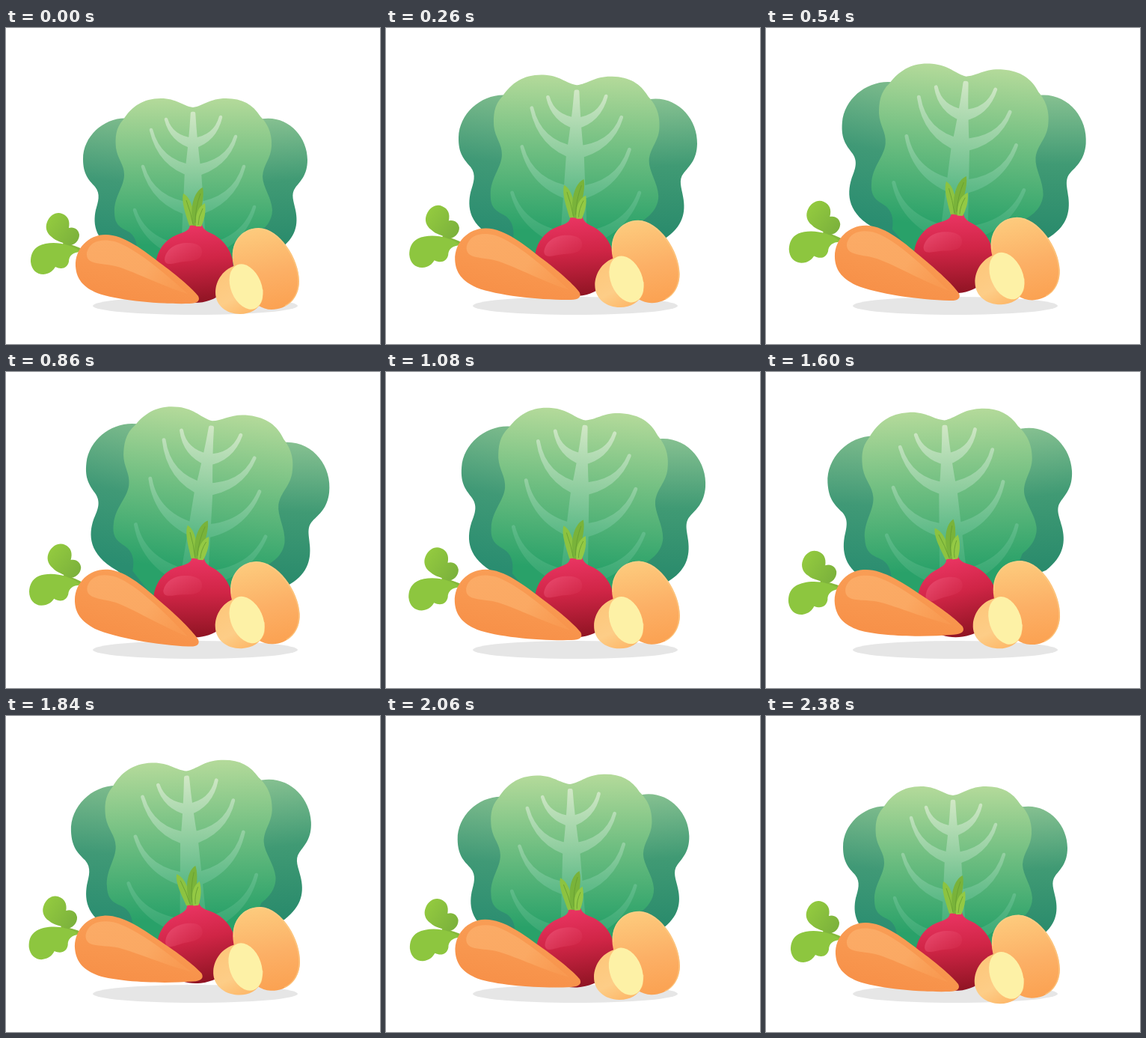
An HTML page that plays this animation: 500x422 px, repeating every 2400 ms.

```html
<!DOCTYPE html>
<html lang="en">
<head>
<meta charset="utf-8">
<title>Vegetables</title>
<style>
  html, body { margin: 0; width: 100%; height: 100%; overflow: hidden; background: #fff; }
  svg { display: block; width: 500px; height: 422px; }
</style>
</head>
<body>
<svg viewBox="0 0 500 422">
  <defs id="grads"></defs>

  <ellipse cx="253" cy="371" rx="137" ry="12" fill="#e6e6e6"/>

  <g id="cabbage">
    <path fill="url(#backL)" d="M175 123 C140 112 103 140 103 175 C103 196 111 203 119 212 C127 222 123 232 120 243 C116 262 118 286 156 302 L205 330 Z"/>
    <path fill="url(#backR)" d="M335 123 C372 112 403 142 403 176 C403 196 394 204 387 213 C380 222 385 232 387 243 C391 262 388 280 365 296 L310 315 Z"/>
    <path fill="url(#front)" d="M250 106 C236 104 228 94 207 94 C183 94 168 105 157 122 C146 134 146 147 147 160 C149 175 158 182 158 196 C158 212 144 226 145 246 C145 262 152 266 162 271 C172 276 176 286 175 300 L205 330 H310 L325 300 L337 274 C346 268 356 258 356 243 C355 226 343 212 343 198 C344 182 354 175 355 158 C356 138 348 126 340 118 C330 102 316 94 294 94 C272 94 264 104 250 106 Z"/>
    <g id="veins" fill="url(#vein)" stroke="url(#vein)" stroke-width="4.5" stroke-linejoin="round"></g>
  </g>

  <g id="radish">
    <path fill="url(#red)" d="M246 262 C246 270 240 272 229 276 C211 283 200 300 200 319 C200 348 224 367 252 367 C282 367 304 348 304 320 C304 300 292 283 276 275 C267 271 263 268 262 262 Q254 258 246 262 Z"/>
    <path fill="url(#redShine)" d="M212 309 C214 294 228 286 246 287 C258 288 263 293 262 301 C260 310 250 311 238 312 C226 313 213 320 212 309 Z"/>
    <path fill="#8cc341" d="M245 264 C240 248 234 232 237 221 C246 226 251 238 253 263 Z"/>
    <path fill="#79b33a" d="M250 264 C245 238 252 218 263 213 C266 228 259 246 257 264 Z"/>
    <path fill="#93c944" d="M254 265 C252 248 258 238 266 234 C268 248 264 258 261 265 Z"/>
    <path fill="none" stroke="#659d31" stroke-width=".8" d="M241 230 Q247 246 250 262 M260 221 Q253 240 253 260 M263 241 Q257 252 257 263"/>
  </g>

  <g id="carrot">
    <path fill="none" stroke="#84b93b" stroke-width="5" d="M102 298 Q92 293 76 289"/>
    <path fill="url(#leafUp)" d="M83 291 C76 285 68 286 61 279 C54 274 52 266 55 259 C59 249 68 245 75 248 C83 251 86 258 84 267 C91 265 97 269 98 276 C98 284 92 290 83 291 Z"/>
    <path fill="#8dc63f" d="M100 299 C84 286 58 284 44 291 C35 296 33 304 33 312 C34 323 41 329 50 329 C59 328 63 324 66 319 C74 323 82 321 84 312 C84 304 90 299 100 299 Z"/>
    <path fill="url(#orange)" d="M93 318 C92 295 110 276 133 276 C158 276 184 297 209 316 C232 333 250 349 257 358 C260 364 256 368 245 368 C205 369 150 364 122 354 C103 346 94 335 93 318 Z"/>
    <path fill="url(#orangeShine)" d="M108 300 C112 284 128 281 145 285 C172 293 212 327 243 355 C210 345 175 327 150 319 C130 313 106 318 108 300 Z"/>
  </g>

  <g id="potato">
    <path fill="url(#skin)" d="M304 316 C298 288 314 267 338 267 C366 268 392 308 392 338 C392 362 375 376 355 376 C330 376 309 344 304 316 Z"/>
    <path fill="none" stroke="#fed08a" stroke-opacity=".6" stroke-width="1.5" d="M304 308 C301 286 316 268 338 268 C365 269 391 309 391 338 C391 354 384 366 373 371"/>
  </g>

  <g id="half">
    <path fill="url(#halfSkin)" d="M312 316 C290 320 280 338 280 353 C280 371 295 382 313 382 C326 382 338 376 343 363 L344 350 Z"/>
    <ellipse cx="321" cy="345.5" rx="20.5" ry="31.5" transform="rotate(-22 321 345.5)" fill="#fdf1a6"/>
  </g>
</svg>

<script>
const LOOP = 2400, RISEN = 410, LEAN = 860, FALL = 1600, REST = 2380;
const $ = id => document.getElementById(id);

// Gradient: id, axis, then "offset colour opacity" stops.
function grad(id, [x1, y1, x2, y2], ...stops) {
  const inner = stops.map(([o, c, a = 1]) =>
    `<stop offset="${o}" stop-color="${c}" stop-opacity="${a}"/>`).join('');
  $('grads').innerHTML +=
    `<linearGradient id="${id}" gradientUnits="userSpaceOnUse" x1="${x1}" y1="${y1}" x2="${x2}" y2="${y2}">${inner}</linearGradient>`;
}
grad('backL', [150, 118, 130, 290], [0, '#7dbb8c'], [.5, '#409976'], [1, '#2a8d70']);
grad('backR', [365, 118, 378, 290], [0, '#87c191'], [.5, '#409a74'], [1, '#2a8b6c']);
grad('front', [0, 94, 0, 290], [0, '#b4da9a'], [.5, '#6cbd80'], [1, '#29a169']);
grad('vein', [0, 112, 0, 295], [0, '#d2e8c6'], [.4, '#93cfa1'], [.7, '#60bb89'], [1, '#3aa974']);
grad('red', [248, 262, 258, 367], [0, '#ea3563'], [.45, '#d02546'], [1, '#8f1423']);
grad('redShine', [222, 288, 250, 316], [0, '#ee5b7c', .55], [1, '#e04060', .2]);
grad('leafUp', [58, 256, 96, 284], [0, '#92c93f'], [1, '#7bb13c']);
grad('orange', [150, 280, 135, 362], [0, '#f99d55'], [1, '#f79048']);
grad('orangeShine', [120, 285, 230, 352], [0, '#fcb06c', .75], [.6, '#fbad68', .8], [1, '#fba55c', .3]);
grad('skin', [335, 267, 357, 376], [0, '#fdcb7d'], [.55, '#fcb066'], [1, '#fba252']);
grad('halfSkin', [290, 325, 320, 382], [0, '#fdc77b'], [.6, '#fdcd87'], [1, '#fdb96b']);

// A tapered rib from its tip to the stem, hanging below the tip.
const rib = (x, y, root, w) => {
  const cx = x + (250 - x) * .2, cy = y + (root - y) * .83;
  return `M${x} ${y}Q${cx} ${cy + w / 2} 250 ${root + w}V${root - w}Q${cx} ${cy - w / 2} ${x} ${y}Z`;
};
$('veins').innerHTML = [
  'M249 114Q247 150 241 195L236 305H266L259 195Q253 150 251 114Z',
  rib(214, 122, 154, 5), rib(287, 119, 154, 5),
  rib(194, 136, 191, 6), rib(307, 145, 191, 6),
  rib(183, 185, 243, 7), rib(318, 185, 243, 7),
  rib(172, 243, 302, 8), rib(332, 239, 302, 8)
].map(d => `<path d="${d}"/>`).join('');

// Each part lifts and grows, leans right, leans left by `turn`, then settles.
// With `keep` the growth stays until the loop restarts.
const parts = [
  { id: 'cabbage', x: 252, y: 305, lift: 24, grow: .09, right: 6.8, left: 3, turn: 1540 },
  { id: 'radish', x: 252, y: 296, lift: 14, grow: .02, right: 4.5, left: 8.5, turn: 1450 },
  { id: 'carrot', x: 135, y: 318, lift: 11, grow: .027, right: 4.2, left: 3.8, turn: 1280 },
  { id: 'potato', x: 347, y: 342, lift: 13, grow: .02, right: -2.5, left: -3, turn: 1280, keep: true },
  { id: 'half', x: 312, y: 325, lift: 15, grow: .04, right: -2, left: -4, turn: 1280, keep: true }
];

// Sine ease from 0 to 1 between two times.
function ease(from, to, t) {
  const u = Math.min(1, Math.max(0, (t - from) / (to - from)));
  return (1 - Math.cos(Math.PI * u)) / 2;
}

function draw(t) {
  const rise = ease(0, RISEN, t), fall = ease(FALL, REST, t), up = rise - fall;
  for (const { id, x, y, lift, grow, right, left, turn, keep } of parts) {
    const swing = ease(LEAN, turn, t);
    const angle = right * (ease(0, LEAN, t) - swing) - left * (swing - fall);
    const scale = 1 + grow * (keep ? rise : up);
    $(id).setAttribute('transform',
      `translate(${x} ${y - lift * up}) rotate(${angle}) scale(${scale}) translate(${-x} ${-y})`);
  }
}

const start = performance.now();
function tick() {
  draw((performance.now() - start) % LOOP);
  requestAnimationFrame(tick);
}
tick();
</script>
</body>
</html>
```
